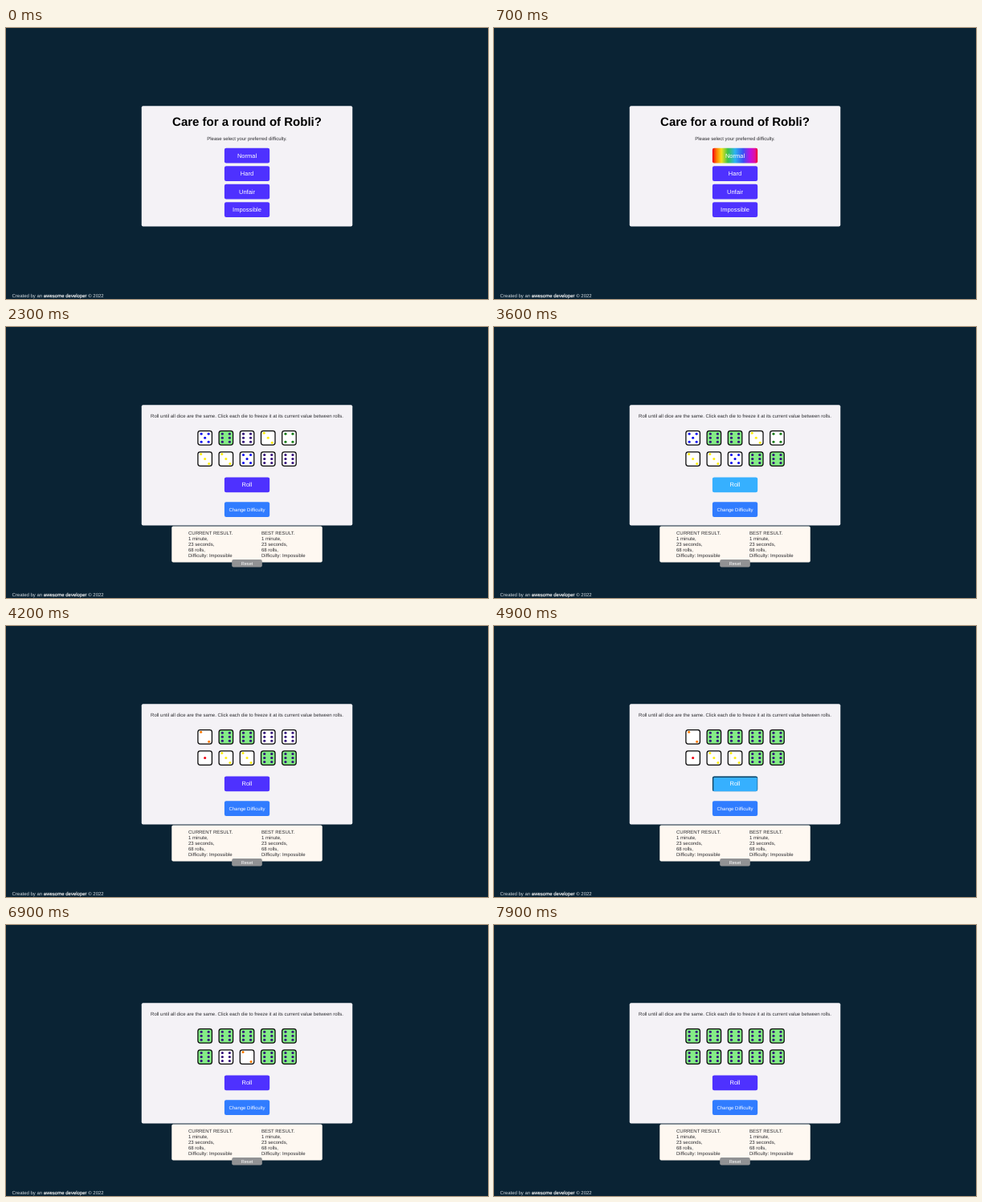
An HTML page for the animation above (8000 ms loop, 600 by 338 pixels).

```html
<!DOCTYPE html>
<html lang="en">
<head>
<meta charset="utf-8">
<title>Dice round</title>
<style>
html, body { margin: 0; width: 100%; height: 100%; overflow: hidden; background: #0a2334; }
svg { display: block; width: 600px; height: 338px; }
text { font-family: "Liberation Sans", Arial, sans-serif; font-size: 6px; text-rendering: geometricPrecision; white-space: pre; }
</style>
</head>
<body>
<svg id="stage" viewBox="0 0 600 338">
  <defs>
    <linearGradient id="rainbow">
      <stop offset="0" stop-color="#f00010"/>
      <stop offset=".09" stop-color="#ff7a00"/>
      <stop offset=".2" stop-color="#f4e21c"/>
      <stop offset=".34" stop-color="#3cc44a"/>
      <stop offset=".5" stop-color="#2cb4f0"/>
      <stop offset=".68" stop-color="#3a50f4"/>
      <stop offset=".84" stop-color="#c010e0"/>
      <stop offset=".94" stop-color="#e010a0"/>
      <stop offset="1" stop-color="#f00020"/>
    </linearGradient>
    <filter id="soft" x="-20%" y="-50%" width="140%" height="200%"><feGaussianBlur stdDeviation=".7"/></filter>
  </defs>
</svg>
<script>
const NS = "http://www.w3.org/2000/svg";
const LOOP = 8000;
const PURPLE = "#4e31ff", SKY = "#36b0ff";
const stage = document.getElementById("stage");

function el(parent, tag, attrs = {}, content) {
  const node = document.createElementNS(NS, tag);
  for (const key in attrs) node.setAttribute(key, attrs[key]);
  if (content) node.textContent = content;
  parent.appendChild(node);
  return node;
}
const box = (parent, x, y, width, height, rx, fill) =>
  el(parent, "rect", { x, y, width, height, rx, fill });
const label = (parent, x, y, content, attrs) =>
  el(parent, "text", { x, y, fill: "#2c2c30", ...attrs }, content);
const show = (node, on) => node.setAttribute("visibility", on ? "inherit" : "hidden");

const MID = { "text-anchor": "middle" };
let clipCount = 0;

function button(parent, y, content, fill = PURPLE, size = 7.5) {
  const x = 271.9, w = 56.25, h = 18.75;
  const id = "press" + clipCount++;
  const face = box(parent, x, y, w, h, 2.2, fill);
  const clip = el(parent, "clipPath", { id });
  box(clip, x, y, w, h, 2.2);
  const inset = el(parent, "g", { "clip-path": `url(#${id})` });
  el(inset, "rect", {
    x: x + .3, y: y + .5, width: w + .3, height: h + 1, rx: 2, fill: "none",
    stroke: "#06202c", "stroke-width": 2.2, "stroke-opacity": .75, filter: "url(#soft)"
  });
  show(inset, false);
  label(parent, 300, y + h / 2 + size * .35, content, { ...MID, fill: "#fff", style: `font-size:${size}px` });
  return { face, inset };
}

// Fixed parts
box(stage, 168.75, 97.3, 262.5, 150.2, 2, "#f4f2f6");
const credit = label(stage, 7.5, 335.5, "", { fill: "#d6dde2" });
el(credit, "tspan", {}, "Created by an ");
el(credit, "tspan", { fill: "#fff", stroke: "#fff", "stroke-width": .15 }, "awesome developer");
el(credit, "tspan", {}, " © 2022");

// Difficulty menu
const menu = el(stage, "g");
label(menu, 300, 122.4, "Care for a round of Robli?", { ...MID, fill: "#000", style: "font-size:15px;font-weight:bold" });
label(menu, 300, 140, "Please select your preferred difficulty.", MID);
const [normal] = ["Normal", "Hard", "Unfair", "Impossible"].map((name, i) => button(menu, 149.8 + i * 22.5, name));

// Game
const game = el(stage, "g");
label(game, 300, 113.4, "Roll until all dice are the same. Click each die to freeze it at its current value between rolls.", MID);
const roll = button(game, 187.4, "Roll");
button(game, 218.3, "Change Difficulty", "#307cff", 6);
box(game, 206.25, 248.4, 187.5, 45.1, 2, "#fef8f1");
[[227, "CURRENT"], [318, "BEST"]].forEach(([x, head]) =>
  [head + " RESULT.", "1 minute,", "23 seconds,", "68 rolls,", "Difficulty: Impossible"]
    .forEach((line, i) => label(game, x, 258.6 + i * 7, line)));
box(game, 281.2, 289.9, 37.6, 9.6, 2, "#919294");
label(game, 300, 296.6, "Reset", { ...MID, fill: "#fff", style: "font-size:5.6px" });

const PIPS = ["#f00010", "#ff7a00", "#ffee10", "#087808", "#0808f0", "#300878"];
const corners = (x, y) => [[-x, -y], [x, -y], [-x, y], [x, y]];
const diagonal = [[-5, -6], [5, 6]], centre = [0, 0], four = corners(4.5, 5);
const FACES = [
  [centre], diagonal, [...diagonal, centre], four, [...four, centre],
  [...four, [-4.5, 0], [4.5, 0]]
];

const dice = Array.from({ length: 10 }, (_, i) => {
  const x = 247.65 + i % 5 * 26.2, y = 138.3 + Math.floor(i / 5) * 26.2;
  const g = el(game, "g", { transform: `translate(${x} ${y})` });
  const body = el(g, "rect", {
    x: -8.75, y: -8.75, width: 17.5, height: 17.5, rx: 2.8,
    stroke: "#050505", "stroke-width": 1.25
  });
  const faces = FACES.map((pips, n) => {
    const face = el(g, "g", { fill: PIPS[n] });
    pips.forEach(([cx, cy]) => el(face, "circle", { cx, cy, r: 1.55 }));
    return face;
  });
  return { body, faces };
});

// Times in ms
const START = 1500;
const ROLLS = [
  [0, "5663433566"], [3900, "2666613366"], [5100, "6666625466"],
  [6100, "6666641366"], [6500, "6666666266"], [7500, "6666666666"]
];
const FREEZE = [5700, 2300, 2600, 4500, 4300, 6900, 7000, 7900, 3200, 2900];
const HOVER = [[3600, 4100], [4700, 5400], [5800, 6800], [7200, 7800]];
const PRESS = [[3700, 3900], [4900, 5100], [5900, 6100], [6300, 6500], [7300, 7500]];
const within = (spans, t) => spans.some(([a, b]) => t >= a && t < b);

function draw(t) {
  const playing = t >= START;
  show(menu, !playing);
  show(game, playing);
  normal.face.setAttribute("fill", t >= 700 ? "url(#rainbow)" : PURPLE);
  show(normal.inset, !playing && t >= 1300);
  roll.face.setAttribute("fill", within(HOVER, t) ? SKY : PURPLE);
  show(roll.inset, playing && within(PRESS, t));
  const values = ROLLS.filter(([at]) => t >= at).pop()[1];
  dice.forEach(({ body, faces }, i) => {
    body.setAttribute("fill", t >= FREEZE[i] ? "#84ec86" : "#fff");
    faces.forEach((face, n) => show(face, playing && n + 1 === +values[i]));
  });
}

function tick() {
  draw(performance.now() % LOOP);
  requestAnimationFrame(tick);
}
tick();
</script>
</body>
</html>
```
